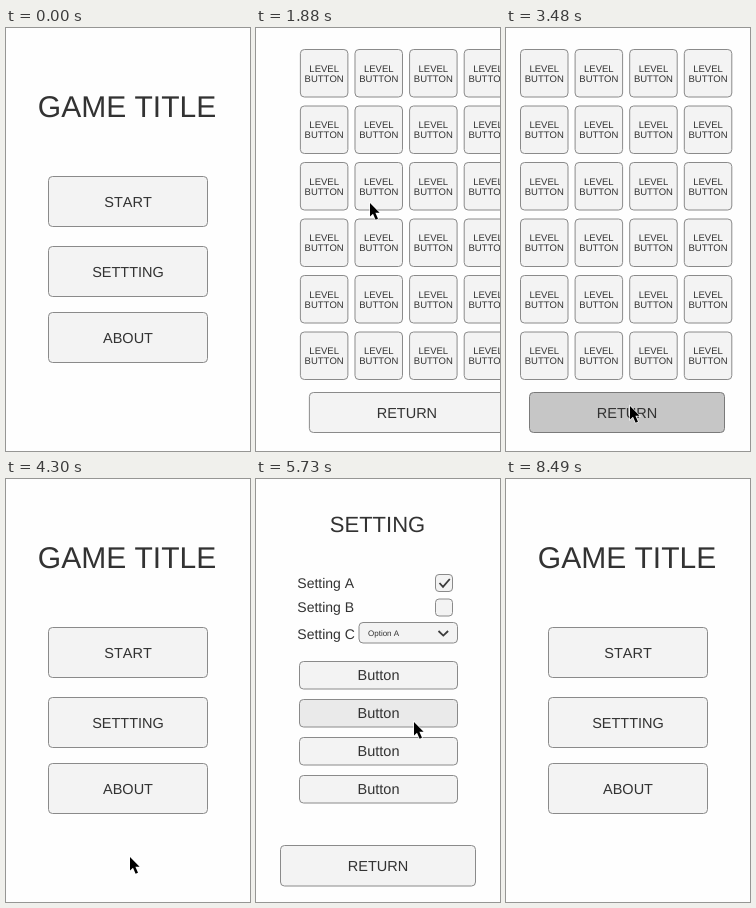
Recreate the animation shown at these times as an HTML page. Size 244 px wide and 423 px high, loop 9300 ms.

```html
<!DOCTYPE html>
<html lang="en">
<head>
<meta charset="utf-8">
<title>Menu flow</title>
<style>
  html, body { margin: 0; width: 100%; height: 100%; overflow: hidden; background: #fefefe; }
  svg { display: block; width: 244px; height: 423px; }
  text { font-family: "Liberation Sans", Arial, sans-serif; fill: #323232; font-kerning: none; text-rendering: geometricPrecision; }
  rect { fill: #f3f3f3; stroke: #8a8a8a; stroke-width: 1; }
  .hover { fill: #eaeaea; }
  .pressed { fill: #c6c6c6; stroke: #7a7a7a; }
  .mark { fill: none; stroke: #3c3c3c; stroke-width: 1.8; }
  #cursor { fill: #000; stroke: #fff; stroke-width: 1.2; paint-order: stroke; }
</style>
</head>
<body>
<svg id="stage" viewBox="0 0 244 423"></svg>
<script>
const LOOP = 9300, WIDTH = 244;
const stage = document.getElementById('stage');

function add(parent, tag, attrs, content = '') {
  const node = document.createElementNS('http://www.w3.org/2000/svg', tag);
  for (const key in attrs) node.setAttribute(key, attrs[key]);
  node.textContent = content;
  parent.append(node);
  return node;
}

const makePage = () => ({ group: add(stage, 'g', {}), buttons: [] });
const menu = makePage(), levels = makePage(), settings = makePage();

// Text is placed by the vertical middle of its capitals.
function label(page, content, x, mid, size, anchor = 'middle') {
  add(page.group, 'text', { x, y: mid + size * 0.36, 'font-size': size, 'text-anchor': anchor }, content);
}

function box(page, x, y, width, height, rx = 4) {
  return add(page.group, 'rect', { x, y, width, height, rx });
}

function button(page, x, y, w, h, lines, size = 14.5, pitch = 10) {
  page.buttons.push({ x, y, w, h, rect: box(page, x, y, w, h) });
  lines.forEach((line, i) =>
    label(page, line, x + w / 2, y + h / 2 + (i - (lines.length - 1) / 2) * pitch, size));
}

const mark = (page, d) => add(page.group, 'path', { d, class: 'mark' });

// Main menu
label(menu, 'GAME TITLE', 121, 78, 30);
button(menu, 42.5, 148.5, 159, 50, ['START']);
button(menu, 42.5, 218.5, 159, 50, ['SETTTING']);
button(menu, 42.5, 284.5, 159, 50, ['ABOUT']);

// Level grid
for (let row = 0; row < 6; row++)
  for (let col = 0; col < 4; col++)
    button(levels, 14.5 + col * 54.6, 21.5 + row * 56.5, 47.5, 47.5, ['LEVEL', 'BUTTON'], 9.5);
button(levels, 23.5, 364.5, 195, 40, ['RETURN']);

// Settings
label(settings, 'SETTING', 121.5, 45, 22);
['A', 'B', 'C'].forEach((name, i) =>
  label(settings, 'Setting ' + name, 41.3, [103.5, 128, 154.8][i], 14, 'start'));
box(settings, 179.5, 95.5, 17, 17, 3.5);
box(settings, 179.5, 120, 17, 17, 3.5);
mark(settings, 'M183.5 104l3.5 3.8 6.8-7.8');
box(settings, 103, 143.5, 98.5, 20.5);
label(settings, 'Option A', 112, 154.5, 8, 'start');
mark(settings, 'M182.5 152l4.8 4.6 4.8-4.6');
for (let i = 0; i < 4; i++) button(settings, 43.5, 182.5 + i * 38, 158, 27.5, ['Button']);
button(settings, 24.5, 366.5, 195, 40.5, ['RETURN']);

const cursor = add(stage, 'path', { id: 'cursor', d: 'M0 0V13.5L3 10.7 5.6 16.8 8 15.8 5.4 9.8H9.6Z' });

const smooth = u => u * u * (3 - 2 * u);
const easeOut = u => u * (2 - u);
const easeIn = u => u * u;

// Pointer moves: start, end, steps, then curve start, control and end points
const moves = [
  { a: 620, b: 1270, n: 13, path: [[231, 123], [150, 150], [114, 175]], ease: easeOut },
  { a: 2540, b: 3230, n: 13, path: [[114, 175], [101, 280], [124, 378]], ease: smooth },
  { a: 4300, b: 5210, n: 17, path: [[124, 378], [297, 290], [158, 243]], ease: smooth },
  { a: 6230, b: 6990, n: 13, path: [[158, 243], [156, 320], [130, 375]], ease: smooth },
  { a: 8210, b: 8490, n: 6, path: [[130, 375], [165, 388], [220, 397]], ease: easeIn, leaves: true }
];

const slides = [
  { a: 1760, b: 2170, n: 8, from: menu, to: levels },
  { a: 3480, b: 3870, n: 8, from: levels, to: menu },
  { a: 5340, b: 5730, n: 8, from: menu, to: settings },
  { a: 7300, b: 7650, n: 7, from: settings, to: menu }
];

const latest = (list, t) => list.filter(item => t >= item.a).pop();

function stepOf({ a, b, n }, t) {
  return t >= b ? n - 1 : Math.floor((t - a) / (b - a) * (n - 1) + 0.05);
}

function pointerAt(t) {
  const move = latest(moves, t);
  if (!move) return null;
  const step = stepOf(move, t), last = move.n - 1;
  if (move.leaves && step >= last) return null;
  const u = move.ease(step / last), v = 1 - u, [p, q, r] = move.path;
  return [0, 1].map(i => v * v * p[i] + 2 * u * v * q[i] + u * u * r[i]);
}

function placePage(page, x) {
  page.group.setAttribute('transform', `translate(${x})`);
  page.group.style.display = Math.abs(x) < WIDTH ? '' : 'none';
}

function paintButtons(page, tip, state) {
  for (const { x, y, w, h, rect } of page.buttons) {
    const over = tip && tip[0] >= x && tip[0] <= x + w && tip[1] >= y && tip[1] <= y + h;
    rect.setAttribute('class', over ? state : '');
  }
}

function draw(t) {
  const tip = pointerAt(t);
  cursor.style.display = tip ? '' : 'none';
  if (tip) cursor.setAttribute('transform', `translate(${tip})`);

  const at = new Map([[menu, 0], [levels, WIDTH], [settings, WIDTH]]);
  const slide = latest(slides, t);
  let active = menu, state = 'hover';
  if (slide) {
    const step = stepOf(slide, t);
    const left = step >= slide.n - 1 ? 0 : WIDTH * 0.35 ** step;
    const side = slide.to === menu ? -1 : 1;
    at.set(slide.to, side * left);
    at.set(slide.from, side * (left - WIDTH));
    active = step ? slide.to : slide.from;
    state = step === 0 ? 'pressed' : step < 4 ? '' : 'hover';
  }
  for (const [page, x] of at) {
    placePage(page, x);
    paintButtons(page, page === active ? tip : null, state);
  }
}

function tick() {
  draw(performance.now() % LOOP);
  requestAnimationFrame(tick);
}
tick();
</script>
</body>
</html>
```
